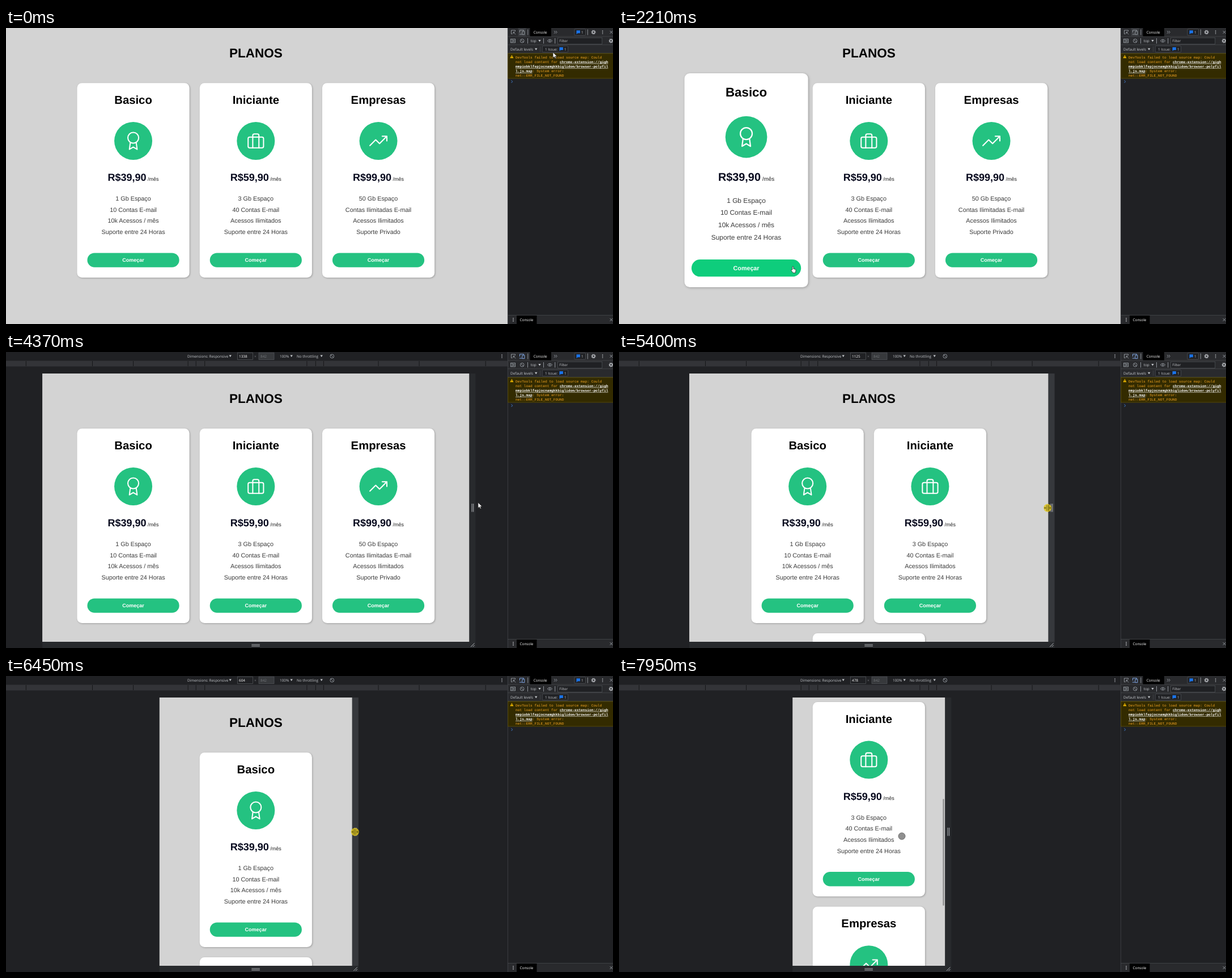
Write an HTML page that moves like this. It is 1071x523 px and loops after 8 s.

```html
<!DOCTYPE html>
<html lang="pt">
<head>
<meta charset="utf-8">
<title>Planos</title>
<style>
html, body { margin: 0; width: 100%; height: 100%; overflow: hidden; background: #202124; }
svg { display: block; }
text { text-rendering: geometricPrecision; white-space: pre; }
.page text { font-family: "Liberation Sans", Arial, sans-serif; text-anchor: middle; }
.bold { font-weight: 700; }
.title { font-size: 22.53px; }
.name { font-size: 20.27px; }
.price { font-size: 18.02px; fill: #080a1e; }
.small { font-size: 9.01px; font-weight: 400; fill: #222; }
.item { font-size: 10.81px; fill: #3a3a3a; }
.label { font-size: 9.01px; fill: #fff; }
.card { fill: #fff; filter: drop-shadow(1.7px 1.7px 1.7px rgba(0, 0, 0, .26)); }
.icon { fill: none; stroke: #fff; stroke-width: 1.5; stroke-linecap: round; stroke-linejoin: round; }
.ui text { font: 6.4px "Open Sans", "Noto Sans", sans-serif; fill: #c4c7cb; }
.ui .lit { fill: #fff; }
.ui .dim { fill: #74777b; }
.ui .log { font: 6.2px "Liberation Mono", monospace; fill: #f5a623; }
.log .link { fill: #fff; font-weight: 700; text-decoration: underline; }
.line { fill: none; stroke: #9aa0a6; stroke-width: .9; }
.box { fill: #202124; stroke: #55585c; stroke-width: .7; }
.grip { fill: none; stroke: #b4b7bb; stroke-width: 1; }
</style>
</head>
<body>
<svg width="1071" height="523" viewBox="0 0 1071 523">
  <defs>
    <clipPath id="clip"><rect id="view"/></clipPath>
    <path id="down" d="M0 0h4.4L2.2 3.4z" fill="#c4c7cb"/>
    <path id="dots" d="M0 -3.2v1.4M0 -.7v1.4M0 1.8v1.4" stroke="#c4c7cb" stroke-width="1.4"/>
    <path id="close" class="line" d="M-2.4 -2.4l4.8 4.8m0 -4.8l-4.8 4.8"/>
    <g id="gear" fill="none" stroke="#aeb1b5">
      <circle r="2.2" stroke-width="1.6"/>
      <circle r="3.4" stroke-width="1.2" stroke-dasharray="1.34 1.33"/>
    </g>
    <path id="note" d="M0 0h6.4v5H2.5L0 6.6z" fill="#1a73e8"/>
  </defs>
  <rect width="1071" height="523" fill="#202124"/>

  <g class="page" clip-path="url(#clip)">
    <rect width="886" height="523" fill="#d3d3d3"/>
    <g id="content"><text class="title bold" y="52">PLANOS</text></g>
    <rect id="thumb" width="2.2" rx="1" fill="#8b8b8b"/>
  </g>

  <g id="device" class="ui">
    <rect y="15.5" width="885" height="10" fill="#333438"/>
    <path id="ticks" stroke="#17181a"/>
    <text x="320" y="9.9">Dimensions: Responsive</text><use href="#down" x="393.5" y="5.6"/>
    <rect class="box" x="408.4" y="1.6" width="27" height="11.8"/><text id="width" class="lit" x="411" y="9.9"></text>
    <text class="dim" x="438" y="10.2">×</text>
    <rect class="box" x="446" y="1.6" width="27" height="11.8" style="fill:#37393c"/><text class="dim" x="449" y="9.9">842</text>
    <text x="483" y="9.9">100%</text><use href="#down" x="501.5" y="5.6"/>
    <text x="513" y="9.9">No throttling</text><use href="#down" x="554.5" y="5.6"/>
    <g class="line"><circle cx="575.3" cy="7.4" r="3.4"/><path d="M573 5l4.6 4.6"/></g>
    <use href="#dots" x="875" y="7.4"/>
    <rect id="foot" y="512" height="11" fill="#282a2d"/>
    <rect id="side" y="38" width="11" height="474"/>
    <path class="grip" d="M433.3 517h14.6M433.3 519.6h14.6"/>
    <path id="grips" class="grip" d="M4.6 268v14.5M7.2 268v14.5M2.5 521l6.5 -6.5M6 521l3 -3"/>
  </g>

  <g class="ui">
    <rect x="885" width="186" height="523" fill="#202124"/>
    <path d="M885 0h186v44.6h-186zM885 507.5h186v15.5h-186z" fill="#292a2d"/>
    <path d="M885.4 0v523M885 15h186M885 29.7h186M885 44.6h186M885 507.5h186" stroke="#494c50" stroke-width=".7"/>
    <rect x="924.5" width="37.5" height="14.6"/><text class="lit" x="930.7" y="9.8">Console</text>
    <g class="line">
      <path d="M893.5 10.5h-2v-6.5h7v2M895 7.2l4.2 4.2m-4.2 -4.2v3m0 -3h3"/>
      <path d="M967 5l2.2 2.4l-2.2 2.4m3 -4.8l2.2 2.4l-2.2 2.4M920.8 2.5v10M1026.3 2.5v10"/>
      <rect x="890.5" y="19.5" width="8" height="6.4"/><path d="M893 19.5v6.4M895 21l2.2 1.7l-2.2 1.7z"/>
      <circle cx="910.7" cy="22.7" r="3.3"/><path d="M908.4 20.4l4.6 4.6M920.5 18v9.5M948.5 18v9.5M968.7 18v9.5"/>
      <path d="M955.3 22.7q4.2 -5 8.4 0q-4.2 5 -8.4 0z"/><circle cx="959.5" cy="22.7" r="1.1"/>
    </g>
    <rect id="toggleBg" x="903.5" width="14" height="14.6"/>
    <path id="toggle" class="line" d="M906.5 8V3.8h7v1.5M905.8 11h4.5M910.8 5.8h4v5.8h-4z"/>
    <rect class="box" x="1003" y="1.8" width="19.5" height="11.2" rx="1"/><use href="#note" x="1006.5" y="4.3"/><text x="1015" y="9.8">1</text>
    <use href="#gear" x="1036.6" y="7.4"/><use href="#dots" x="1052.6" y="7.4"/><use href="#close" x="1068" y="7.4"/>
    <text x="925.7" y="25">top</text><use href="#down" x="939.3" y="21"/>
    <rect class="box" x="973.5" y="17.2" width="78.3" height="11.2"/><text x="976.3" y="25.2">Filter</text>
    <use href="#gear" x="1067.5" y="22.7"/>
    <text x="890" y="39.7">Default levels</text><use href="#down" x="933" y="35.8"/>
    <path d="M942.5 32.5v9.5" stroke="#494c50" stroke-width=".7"/>
    <rect class="box" x="946.2" y="31.7" width="45.4" height="11" rx="1"/><text x="951" y="39.7">1 Issue:</text>
    <use href="#note" x="976.5" y="34"/><text x="985" y="39.7">1</text>
    <rect x="885.8" y="45" width="186" height="44" fill="#332b00" stroke="#665500" stroke-width=".7"/>
    <path d="M892.4 47.6l3 5.6h-6z" fill="#f5bd00"/><path d="M892.4 49.3v1.8m0 .5v.8" stroke="#332b00" stroke-width=".8"/>
    <g id="log"></g>
    <path d="M891.6 92.4l2 2.3l-2 2.3" fill="none" stroke="#3f7fd0"/>
    <use href="#dots" x="895" y="515.5"/>
    <rect x="901" y="508" width="35.5" height="15"/><text class="lit" x="906.5" y="518">Console</text>
    <use href="#close" x="1068" y="515.5"/>
  </g>

  <g id="cursor">
    <path id="arrow" d="M0 0V9.6L2.3 7.6L3.8 11L5.4 10.3L3.9 7H7Z" fill="#fff" stroke="#222" stroke-width=".7"/>
    <path id="hand" d="M2.5 6V1.3a1 1 0 0 1 2 0V4.6l3.2.8q1.2.3 1 1.6L8 11.8H3.7L.5 7.6q-.4 -1.5 1 -1.2z" fill="#fff" stroke="#222" stroke-width=".8"/>
    <g id="drag">
      <circle r="7" fill="#e0c518" fill-opacity=".82"/>
      <path d="M-1.3 -5v10M1.3 -5v10M-2.5 0h-3l1.8 -2m-1.8 2l1.8 2M2.5 0h3l-1.8 -2m1.8 2l-1.8 2" fill="none" stroke="#55500f" stroke-width=".9"/>
    </g>
    <circle id="touch" r="6" fill="#8f8f8f" stroke="#6e6e6e"/>
  </g>
</svg>
<script>
const $ = id => document.getElementById(id);
const set = (el, attrs) => { for (const k in attrs) el.setAttribute(k, attrs[k]); };
const show = (el, on) => { el.style.display = on ? '' : 'none'; };

const LOOP = 8000, SCALE = .5631, MID = 440.8, PITCH_X = 216.25, PITCH_Y = 361.6;
const DEVICE_AT = 3880, GRAB = 4600, RELEASE = 7050, TOP = 38, VIEW_H = 474, PAGE_H = 1192;

const plans = [
  { name: 'Basico', price: '39,90', hover: [[1540, 2290]],
    items: ['1 Gb Espaço', '10 Contas E-mail', '10k Acessos / mês', 'Suporte entre 24 Horas'],
    icon: '<circle cx="12" cy="8" r="7"/><path d="M8.21 13.89L7 23l5-3l5 3l-1.21-9.12"/>' },
  { name: 'Iniciante', price: '59,90', hover: [[1250, 1510], [2320, 2470]],
    items: ['3 Gb Espaço', '40 Contas E-mail', 'Acessos Ilimitados', 'Suporte entre 24 Horas'],
    icon: '<rect x="2" y="7" width="20" height="14" rx="2"/><path d="M16 21V5a2 2 0 0 0-2-2h-4a2 2 0 0 0-2 2v16"/>' },
  { name: 'Empresas', price: '99,90', hover: [[970, 1230], [2490, 3030]],
    items: ['50 Gb Espaço', 'Contas Ilimitadas E-mail', 'Acessos Ilimitados', 'Suporte Privado'],
    icon: '<path d="M23 6l-9.5 9.5l-5-5L1 18M17 6h6v6"/>' }
];
const buttonHover = [[1790, 2270]];

// Card coordinates are relative to the card's centre.
const cardMarkup = p => `<g class="plan">
  <rect class="card" x="-99.1" y="-171.8" width="198.2" height="343.6" rx="8.5"/>
  <text class="name bold" y="-134.9">${p.name}</text>
  <circle cy="-69.6" r="33.5" fill="#24c281"/>
  <g class="icon" transform="translate(0 -69.6) scale(1.36) translate(-12 -12)">${p.icon}</g>
  <text class="price bold" y="1">R$${p.price}<tspan class="small"> /mês</tspan></text>
  ${p.items.map((s, i) => `<text class="item" y="${36 + i * 19.7}">${s}</text>`).join('')}
  <g class="button"><rect x="-81.1" y="-12.7" width="162.2" height="25.4" rx="12.7"/>
  <text class="label bold" y="3.2">Começar</text></g></g>`;
$('content').insertAdjacentHTML('beforeend', plans.map(cardMarkup).join(''));
const cards = [...document.querySelectorAll('.plan')];
const title = document.querySelector('.title');

$('log').innerHTML = [
  'DevTools failed to load source map: Could',
  'not load content for <tspan class="link">chrome-extension://gigh</tspan>',
  '<tspan class="link">mmpiobklfepjocnamgkkbiglidom/browser-polyfil</tspan>',
  '<tspan class="link">l.js.map</tspan>: System error:',
  'net::ERR_FILE_NOT_FOUND'
].map((s, i) => `<text class="log" x="899" y="${53.6 + i * 8.15}">${s}</text>`).join('');

$('ticks').setAttribute('d', [320, 375, 425, 768, 1024, 1440].map(w => {
  const d = w * SCALE / 2;
  return `M${MID - d} 16v9M${MID + d} 16v9`;
}).join(''));

// Keys are [time, value, value...], joined by straight lines.
const path = [
  [0, 965, 43], [150, 976, 36], [850, 788, 232], [980, 756, 250], [1540, 324, 345],
  [1730, 260, 390], [1900, 222, 423], [2080, 250, 425], [2210, 303, 421], [2290, 333, 415],
  [2490, 558, 388], [2690, 690, 360], [3010, 754, 343], [3200, 795, 235], [3490, 880, 31],
  [3600, 935, 15], [3720, 911, 7], [3880, 911, 7], [4370, 833, 266], [4600, 823, 275]
];
const widths = [[4770, 1338], [5000, 1310], [5400, 1126], [5640, 944], [6100, 720],
  [6430, 604], [6560, 603], [7000, 478]];
const touchPath = [[RELEASE, 580, 276], [7330, 495, 283], [7840, 495, 283], [7940, 499, 283]];

function at(keys, t) {
  const i = keys.findIndex(k => k[0] > t);
  if (i === 0) return keys[0].slice(1);
  if (i < 0) return keys[keys.length - 1].slice(1);
  const a = keys[i - 1], b = keys[i], p = (t - a[0]) / (b[0] - a[0]);
  return a.slice(1).map((v, n) => v + (b[n + 1] - v) * p);
}
const clamp = p => Math.min(1, Math.max(0, p));
const ease = p => 1 - (1 - clamp(p)) ** 2.3;
const hoverLevel = (spans, t) => Math.max(...spans.map(([on, off]) =>
  ease((t - on) / 400) * (1 - ease((t - off) / 400))));
const rightEdge = t => MID + at(widths, t)[0] * SCALE / 2;

function drawPage(t, device, w) {
  const right = rightEdge(t), left = 2 * MID - right, span = w * SCALE;
  const p = clamp((t - 7350) / 360), scroll = 451 * p * p * (3 - 2 * p);
  set($('view'), device
    ? { x: left, y: TOP, width: right - left, height: VIEW_H }
    : { x: 0, y: 0, width: 886, height: 523 });
  set($('content'), { transform: `translate(0 ${device ? TOP - scroll : 0})` });
  title.setAttribute('x', MID);

  const perRow = device ? Math.max(1, Math.min(3, Math.floor(span / PITCH_X))) : 3;
  cards.forEach((card, i) => {
    const row = Math.floor(i / perRow), count = Math.min(perRow, 3 - row * perRow);
    const x = MID + (i % perRow - (count - 1) / 2) * PITCH_X;
    const s = 1 + .1 * hoverLevel(plans[i].hover, t);
    set(card, { transform: `translate(${x} ${269.1 + row * PITCH_Y}) scale(${s})` });
    const b = i ? 0 : hoverLevel(buttonHover, t);
    const button = card.querySelector('.button');
    set(button, { transform: `translate(0 141) scale(${1 + .083 * b})` });
    set(button.firstChild, { fill: `rgb(${36 - 22 * b},${194 + 11 * b},${129 - 5 * b})` });
  });

  show($('thumb'), t > 7330);
  set($('thumb'), { x: right - 4, y: TOP + scroll * VIEW_H / PAGE_H, height: VIEW_H * VIEW_H / PAGE_H });
}

function drawDevice(t, device, w) {
  const right = rightEdge(t), left = 2 * MID - right;
  show($('device'), device);
  $('width').textContent = Math.round(w);
  set($('foot'), { x: left, width: right - left + 11 });
  set($('side'), { x: right, fill: t > GRAB && t < RELEASE ? '#36383c' : '#282a2d' });
  set($('grips'), { transform: `translate(${right} 0)` });
  $('toggle').style.stroke = device ? '#8ab4f8' : '';
  set($('toggleBg'), { fill: device ? '#292a2d' : '#393b3f' });
  $('toggleBg').parentNode.insertBefore($('toggleBg'), $('toggle'));
}

function drawCursor(t) {
  const mode = t >= RELEASE ? 'touch' : t >= GRAB ? 'drag'
    : t > buttonHover[0][0] && t < buttonHover[0][1] ? 'hand' : 'arrow';
  for (const id of ['arrow', 'hand', 'drag', 'touch']) show($(id), id === mode);
  const [x, y] = mode === 'touch' ? at(touchPath, t)
    : mode === 'drag' ? [rightEdge(t + 30) + 5, 275.5] : at(path, t);
  set($('cursor'), { transform: `translate(${x} ${y})` });
}

const start = performance.now();
function frame() {
  const t = (performance.now() - start) % LOOP, device = t >= DEVICE_AT, [w] = at(widths, t);
  drawPage(t, device, w);
  drawDevice(t, device, w);
  drawCursor(t);
  requestAnimationFrame(frame);
}
frame();
</script>
</body>
</html>
```
